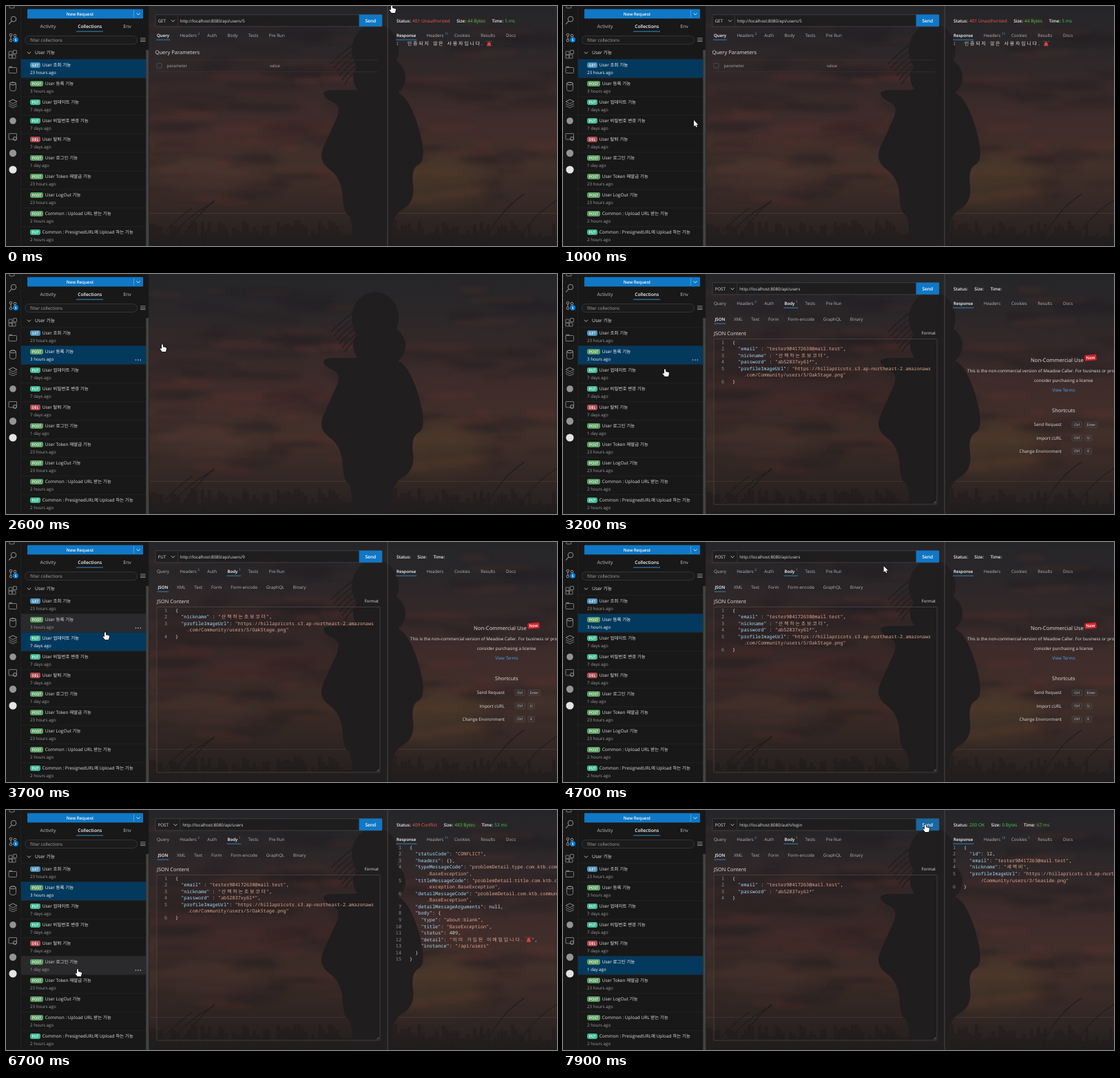
These frames come from a looping animation (800 by 349 pixels, 8 s). An HTML page with a canvas:

```html
<!DOCTYPE html>
<html lang="ko">
<head>
<meta charset="utf-8">
<title>API client</title>
<style>
html, body { margin: 0; width: 100%; height: 100%; overflow: hidden; background: #181818; }
canvas { display: block; width: 800px; height: 349px; }
</style>
</head>
<body>
<canvas id="stage"></canvas>
<script>
const W = 800, H = 349, LOOP = 8000, LAG = 300;
const SANS = '"Open Sans", "Noto Sans CJK KR", "Noto Sans CJK", sans-serif';
const MONO = '"Noto Sans Mono", "DejaVu Sans Mono", monospace';
const HANGUL = '"Noto Sans CJK KR", "Noto Sans CJK", sans-serif';
const CELL = 4.12, ROW_TOP = 77.5, ROW_H = 27;
const BLUE = '#1078c6', ACCENT = '#2f8fca', GREEN = '#45cf50', RED = '#fa5a56';
const GREY = '#a8a8a8', LIGHT = '#e0e0e0', WHITE = '#fff', STRING = '#dfa78f';
const SEND = { x: 512.6, y: 12.6, w: 33.4, h: 17.2 };

const dpr = window.devicePixelRatio || 1;
function makeCanvas(el) {
  el.width = W * dpr;
  el.height = H * dpr;
  const c = el.getContext('2d');
  c.scale(dpr, dpr);
  return c;
}
const ctx = makeCanvas(document.getElementById('stage'));
ctx.textRendering = 'geometricPrecision';

// ---------- helpers ----------
function text(s, x, y, size = 6.2, color = LIGHT, weight = 400, align = 'left') {
  ctx.font = `${weight} ${size}px ${SANS}`;
  ctx.textAlign = align;
  ctx.fillStyle = color;
  ctx.fillText(s, x, y + size * 0.36);
  return ctx.measureText(s).width;
}
function rect(x, y, w, h, color) {
  ctx.fillStyle = color;
  ctx.fillRect(x, y, w, h);
}
function pill(x, y, w, h, r, fill, stroke) {
  ctx.beginPath();
  ctx.roundRect(x, y, w, h, r);
  if (fill) { ctx.fillStyle = fill; ctx.fill(); }
  if (stroke) { ctx.strokeStyle = stroke; ctx.lineWidth = 0.8; ctx.stroke(); }
}
function line(points, color, width = 0.8) {
  ctx.beginPath();
  points.forEach(([x, y]) => ctx.lineTo(x, y));
  ctx.strokeStyle = color;
  ctx.lineWidth = width;
  ctx.stroke();
}
function dot(x, y, r, color) {
  ctx.beginPath();
  ctx.arc(x, y, r, 0, 7);
  ctx.fillStyle = color;
  ctx.fill();
}
function ring(x, y, rx, ry, color) {
  ctx.beginPath();
  ctx.ellipse(x, y, rx, ry, 0, 0, 7);
  ctx.strokeStyle = color;
  ctx.lineWidth = 1;
  ctx.stroke();
}
const vee = (x, y, w, h, color) => line([[x - w, y - h], [x, y + h], [x + w, y - h]], color);
const chevron = (x, y, color = LIGHT) => vee(x, y, 2.5, 1.3, color);

// ---------- backdrop ----------
function makeBackdrop() {
  const el = document.createElement('canvas');
  const c = makeCanvas(el);
  let seed = 11;
  const rnd = (a = 0, b = 1) => a + (b - a) * (seed = seed * 16807 % 2147483647) / 2147483647;
  const blob = (x, y, rx, ry, tilt, color) => {
    c.fillStyle = color;
    c.beginPath();
    c.ellipse(x, y, rx, ry, tilt, 0, 7);
    c.fill();
  };
  const sky = c.createLinearGradient(0, 0, 0, H);
  ['#252528', '#2b2729', '#37292a', '#402d2b', '#42302a', '#352825', '#242021']
    .forEach((col, i, all) => sky.addColorStop(i / (all.length - 1), col));
  c.fillStyle = sky;
  c.fillRect(0, 0, W, H);
  c.filter = 'blur(3px)';
  for (let i = 0; i < 130; i++) {
    const color = rnd() < 0.4 ? 'rgba(112,56,48,.17)' : 'rgba(33,32,36,.3)';
    blob(rnd(208, W), rnd(20, 285), rnd(14, 60), rnd(2, 8), rnd(-0.1, 0.1), color);
  }
  c.filter = 'blur(14px)';
  blob(615, 255, 80, 35, 0, 'rgba(98,76,46,.3)');
  blob(290, 240, 75, 20, 0, 'rgba(95,72,64,.25)');
  c.filter = 'none';
  c.fillStyle = 'rgba(95,85,50,.5)';
  c.fillRect(208, 301, W - 208, 0.8);
  c.fillStyle = 'rgba(24,20,20,.3)';
  for (let x = 208; x < W; x += 5) {
    const h = rnd(12, 38);
    c.fillRect(x, H - h, 4.5, h);
  }
  const stroke = (x, y, mx, my, tx, ty) => {
    c.beginPath();
    c.moveTo(x, y);
    c.quadraticCurveTo(mx, my, tx, ty);
    c.stroke();
  };
  c.strokeStyle = c.fillStyle = '#211e20';
  c.lineWidth = 1.4;
  for (const x of [214, 232, 250, 692, 740]) {
    const ty = rnd(262, 296);
    stroke(x, H, x + 22, ty + 25, x + rnd(45, 85), ty);
  }
  // plain figure seen from behind: head, wind-blown hair, coat and legs
  blob(536, 64, 34, 38, 0, '#211e20');
  blob(542, 104, 38, 32, 0, '#211e20');
  for (let i = 0; i < 6; i++) stroke(515, 50 + i * 8, 495, 60 + i * 9, 472 + i * 4, 84 + i * 6);
  const coat = [[500, 122], [460, 122], [462, 134], [488, 146], [470, 185], [452, 225], [487, 250], [490, 300],
    [502, 306], [504, 360], [556, 360], [560, 305], [594, 285], [588, 236], [610, 225], [596, 160], [570, 118]];
  c.beginPath();
  coat.forEach(([x, y], i) => {
    const [nx, ny] = coat[(i + 1) % coat.length];
    c.quadraticCurveTo(x, y, (x + nx) / 2, (y + ny) / 2);
  });
  c.fill();
  return el;
}
const backdrop = makeBackdrop();

// ---------- sidebar ----------
const BADGES = { GET: '#4f92ba', POST: '#5fa065', PUT: '#43b897', DEL: '#b04d54' };
const ROWS = [
  ['GET', 'User 조회 기능', '23 hours ago'], ['POST', 'User 등록 기능', '3 hours ago'],
  ['PUT', 'User 업데이트 기능', '7 days ago'], ['PUT', 'User 비밀번호 변경 기능', '7 days ago'],
  ['DEL', 'User 탈퇴 기능', '7 days ago'], ['POST', 'User 로그인 기능', '1 day ago'],
  ['POST', 'User Token 재발급 기능', '23 hours ago'], ['POST', 'User LogOut 기능', '23 hours ago'],
  ['POST', 'Common : Upload URL 받는 기능', '2 hours ago'],
  ['PUT', 'Common : PresignedURL에 Upload 하는 기능', '2 hours ago']
];

function activityBar() {
  const col = '#949494';
  pill(5, -5, 7, 8, 1, null, col);
  ring(11, 19, 3.8, 3.8, col);
  line([[8.3, 21.8], [4, 26.5]], col, 1.1);
  for (const [x, y] of [[7, 42], [13, 43], [7, 50]]) ring(x, y, 1.8, 1.8, col);
  line([[7, 48], [7, 44]], col, 1);
  dot(14, 49, 4, '#0078d4');
  text('5', 14, 49, 4.8, WHITE, 700, 'center');
  for (const [x, y] of [[4, 66], [4, 71], [9, 71], [10.5, 64.5]]) pill(x, y, 5, 5, 0.4, null, col);
  pill(4, 89.5, 11.5, 8, 1, null, col);
  line([[4, 89], [8, 88], [9.5, 89.5]], col, 1);
  pill(5.5, 111, 9, 12.5, 3, null, col);
  ring(10, 113, 4.5, 1.8, col);
  line([[4, 139], [10, 136], [16, 139]], col, 1);
  for (let i = 0; i < 3; i++) vee(10, 140.5 + i * 3, 6, 1.5, col);
  pill(4, 185.5, 11.5, 8.5, 0.5, null, col);
  ring(13, 193, 2.6, 2.6, col);
  dot(10, 167, 4.8, col);
  dot(10, 214, 5.2, col);
  dot(10, 238, 5.6, '#e4e4e4');
}

function sidebar(selected, hover) {
  rect(0, 0, 208, H, '#181818');
  rect(21, 0, 0.8, H, '#252525');
  activityBar();
  pill(31, 4.5, 168, 13.8, 1, BLUE);
  rect(185, 6, 0.7, 10.5, '#6fb2e2');
  text('New Request', 107.5, 11.6, 6.2, WHITE, 600, 'center');
  chevron(192, 11.6, WHITE);
  text('Activity', 61, 29.2, 6.9, '#c0c0c0', 400, 'center');
  text('Collections', 121.7, 29.2, 6.6, WHITE, 600, 'center');
  text('Env', 176, 29.2, 6.9, '#c0c0c0', 400, 'center');
  rect(102, 36.5, 39, 1, ACCENT);
  pill(27.5, 43.5, 163, 12, 6, '#1b1b1b', '#3c3c3c');
  text('filter collections', 35, 49.8, 6.4, GREY);
  for (let i = 0; i < 3; i++) rect(195, 46.5 + i * 2.4, 7.5, 0.7, '#c0c0c0');
  chevron(33.5, 68);
  text('User 기능', 42, 68, 6.8);
  ROWS.forEach(([method, name, age], i) => {
    const y = ROW_TOP + i * ROW_H, on = i === selected, w = 3 + 4 * method.length;
    rect(22, y, 181, 0.6, '#262626');
    if (on || i === hover) rect(22, y, 181, ROW_H, on ? '#04395e' : '#2a2a2c');
    pill(35, y + 4.4, w, 8, 2.4, BADGES[method]);
    text(method, 35 + w / 2, y + 8.5, 5.3, WHITE, 600, 'center');
    text(name, 37.7 + w, y + 8.5, 6.5, on ? WHITE : LIGHT);
    text(age, 35, y + 19.6, 6.2, on ? WHITE : '#a0a0a0');
    if (i === hover) for (let k = 0; k < 3; k++) dot(188.5 + k * 3.4, y + 20.5, 0.75, LIGHT);
  });
  rect(203.3, 64, 4, H - 64, '#434343');
  rect(207.3, 0, 0.8, H, '#2a2a2a');
}

// ---------- code view ----------
function siren(x, y) {
  pill(x + 1.6, y - 2, 4.8, 4.5, [2.4, 2.4, 0, 0], '#e0413d');
  rect(x + 0.8, y + 2.3, 6.4, 1.5, '#c8403c');
  for (let i = -1; i < 2; i++) line([[x + 4 + i * 3.6, y - 3.5], [x + 4 + i * 2.6, y - 2.4]], '#e98d80');
}
function codeRun(s, x, y, color) {
  ctx.textAlign = 'left';
  for (const part of s.split(/([가-힣]+|🚨)/u)) {
    if (!part) continue;
    ctx.fillStyle = color;
    if (part === '🚨') {
      siren(x, y);
      x += CELL * 2;
    } else if (/[가-힣]/.test(part)) {
      ctx.font = `400 7px ${HANGUL}`;
      ctx.letterSpacing = '1.8px';
      ctx.fillText(part, x + 0.8, y + 2.4);
      ctx.letterSpacing = '0px';
      x += part.length * CELL * 2;
    } else {
      ctx.font = `500 6.87px ${MONO}`;
      ctx.fillText(part, x, y + 2.4);
      x += part.length * CELL;
    }
  }
  return x;
}
function tokenColor(tok, rest) {
  if (tok[0] === '"') return /^\s*:/.test(rest) ? '#a2dcfa' : STRING;
  if (tok === 'null') return '#b9d4ea';
  return /^\d/.test(tok) ? '#c5dcb8' : LIGHT;
}
// A leading "~" marks the wrapped tail of the line above.
function code(lines, x, y0, step, wrap) {
  let n = 0;
  lines.forEach((raw, i) => {
    const y = y0 + i * step;
    if (raw[0] === '~') {
      codeRun(raw.slice(1), x + wrap * CELL, y, STRING);
      return;
    }
    const num = String(++n);
    codeRun(num, x - 12 - num.length * CELL, y, '#8c9196');
    const body = raw.trimStart();
    let cx = x + (raw.length - body.length) * CELL;
    for (const m of body.matchAll(/"[^"]*"?|\w+|[^"\w]+/g))
      cx = codeRun(m[0], cx, y, tokenColor(m[0], body.slice(m.index + m[0].length)));
  });
}

// ---------- request and response data ----------
const LOCAL = 'http://localhost:8080';
const IMAGE = '  "profileImageUrl": "https://hillapricots.s3.ap-northeast-2.amazonaws';
const IMAGE_END = '~.com/Community/users/5/OakStage.png"';
const NICK = '  "nickname" : "산책하는초보코더",';
const REQUESTS = {
  get: { method: 'GET', url: LOCAL + '/api/users/5' },
  put: { method: 'PUT', url: LOCAL + '/api/users/9', body: ['{', NICK, IMAGE, IMAGE_END, '}'] },
  post: { method: 'POST', url: LOCAL + '/api/users', body: ['{', '  "email" : "tester904172638@mail.test",',
    NICK, '  "password" : "ab52837xy61*",', IMAGE, IMAGE_END, '}'] },
  login: { method: 'POST', url: LOCAL + '/auth/login', body: ['{', '  "email" : "tester90417263@mail.test",',
    '  "password" : "ab52837xy61*"', '}'] }
};
const RESPONSES = {
  none: { status: '', size: '', time: '' },
  denied: { status: '401 Unauthorized', size: '44 Bytes', time: '5 ms', headers: '11',
    body: ['인증되지 않은 사용자입니다. 🚨'] },
  conflict: { status: '409 Conflict', size: '483 Bytes', time: '53 ms', headers: '11', body: [
    '{', '  "statusCode": "CONFLICT",', '  "headers": {},',
    '  "typeMessageCode": "problemDetail.type.com.ktb.community', '~.BaseException",',
    '  "titleMessageCode": "problemDetail.title.com.ktb.community', '~.exception.BaseException",',
    '  "detailMessageCode": "problemDetail.com.ktb.community', '~.BaseException",',
    '  "detailMessageArguments": null,', '  "body": {', '    "type": "about:blank",',
    '    "title": "BaseException",', '    "status": 409,', '    "detail": "이미 가입된 이메일입니다. 🚨",',
    '    "instance": "/api/users"', '  }', '}'] },
  ok: { status: '200 OK', size: '0 Bytes', time: '67 ms', headers: '12', cookies: '1', body: [
    '{', '  "id": 12,', '  "email": "tester90417263@mail.test",', '  "nickname": "새벽비",',
    IMAGE, '~/Community/users/3/Seaside.png"', '}'] }
};

// ---------- panels ----------
function tabs(names, x, y, gap, active, marks = {}) {
  for (const name of names) {
    const on = name === active, mark = marks[name];
    const w = text(name, x, y, on ? 6.1 : 6.25, on ? WHITE : '#b4b4b4', on ? 600 : 400);
    if (on) rect(x - 1, y + 6.2, w + (mark ? 6 : 2), 0.9, ACCENT);
    if (mark) text(mark, x + w + 1.5, y - 2, 4.8, '#58b2f0');
    x += w + gap;
  }
}

function requestPanel(req, hot) {
  const split = req.method === 'POST' ? 252.5 : 249;
  pill(217, SEND.y, 329, SEND.h, 1, 'rgba(24,24,24,.55)', '#444');
  text(req.method, 220.5, 21.6);
  chevron(split - 6.5, 21.6);
  rect(split, SEND.y, 0.7, SEND.h, '#3c3c3c');
  text(req.url, split + 3.7, 21.6, 6.15);
  pill(SEND.x, SEND.y, SEND.w, SEND.h, 0.6, hot ? '#1967a3' : BLUE);
  text('Send', SEND.x + SEND.w / 2, 21.4, 6.6, WHITE, 600, 'center');
  tabs(['Query', 'Headers', 'Auth', 'Body', 'Tests', 'Pre Run'], 219, 42.5, 15.4,
    req.body ? 'Body' : 'Query', { Headers: '2', Body: req.body && '1' });
  if (!req.body) {
    text('Query Parameters', 216.5, 67, 7.6);
    for (const y of [78, 95.5]) rect(217, y, 323, 0.6, '#3a3636');
    pill(219, 83.3, 7, 7, 1, null, '#555');
    text('parameter', 233.5, 87, 6, GREY);
    text('value', 383, 87, 6, GREY);
    return;
  }
  tabs(['JSON', 'XML', 'Text', 'Form', 'Form-encode', 'GraphQL', 'Binary'], 220.5, 65.5, 12.8, 'JSON');
  text('JSON Content', 219, 86, 7.4);
  text('Format', 541, 86, 6.1, LIGHT, 400, 'right');
  pill(219, 94.5, 324, 240.5, 0.5, 'rgba(22,21,22,.15)', '#4a4646');
  for (const d of [1.2, 3]) line([[541.5 - d, 333.5], [541.5, 333.5 - d]], '#aaa', 0.6);
  code(req.body, 246, 99.5, 9.5, 4);
}

function keyCap(label, x, w, y) {
  pill(x, y - 4.2, w, 8.6, 1.5, 'rgba(70,64,64,.35)', '#4c4848');
  text(label, x + w / 2, y, 5, '#d0d0d0', 400, 'center');
}

function notice() {
  const mid = 726.8;
  text('Non-Commercial Use', 679, 125, 7.75);
  ctx.save();
  ctx.translate(766, 121.7);
  ctx.rotate(-0.08);
  pill(-8.5, -4.2, 17, 8.4, 1.5, '#d3232b');
  text('New', 0, 0, 6, WHITE, 600, 'center');
  ctx.restore();
  text('This is the non-commercial version of Meadow Caller. For business or professional use, please', 587, 141, 6.25);
  text('consider purchasing a license', mid, 155, 6.25, LIGHT, 400, 'center');
  text('View Terms', mid, 169, 6.3, '#45a8f0', 400, 'center');
  text('Shortcuts', mid, 198.5, 7.5, LIGHT, 400, 'center');
  [['Send Request', 'Enter'], ['Import cURL', 'U'], ['Change Environment', 'E']].forEach(([label, key], i) => {
    const y = 219.2 + i * 19.2;
    text(label, 724, y, 6.3, LIGHT, 400, 'right');
    keyCap('Ctrl', 739, 14.5, y);
    keyCap(key, 758, 7.4 + 2.1 * key.length, y);
  });
}

function responsePanel(res) {
  rect(553.6, 0, 0.9, H, '#4e4b4b');
  let x = 567;
  const good = res.status.startsWith('2') ? GREEN : RED;
  for (const [label, value, col] of [['Status:', res.status, good], ['Size:', res.size, GREEN], ['Time:', res.time, GREEN]]) {
    x += text(label, x, 22, 6.3, '#f0f0f0', 600);
    if (value) x += 2.2 + text(value, x + 2.2, 22, 6.55, col);
    x += 9.5;
  }
  tabs(['Response', 'Headers', 'Cookies', 'Results', 'Docs'], 567, 42.5, 15.6, 'Response',
    { Headers: res.headers, Cookies: res.cookies });
  if (res.body) code(res.body, res.body.length > 9 ? 586 : 582, 54.4, 9.56, 6);
  else notice();
}

// ---------- cursor ----------
const HAND = new Path2D('M0 1Q1 -.6 2 1V4L6 5Q7.4 5 7 7L5.8 11H.8L-2.4 7Q-2 5.4 0 7Z');
const ARROW = new Path2D('M0 0V9L2 7.2L3.4 10.2L4.8 9.6L3.5 6.7H6.3Z');
function drawCursor(x, y, path) {
  ctx.save();
  ctx.translate(x, y);
  ctx.lineJoin = 'round';
  ctx.strokeStyle = '#111';
  ctx.lineWidth = 1.4;
  ctx.stroke(path);
  ctx.fillStyle = WHITE;
  ctx.fill(path);
  ctx.restore();
}

// ---------- timeline ----------
const VIEWS = [
  [0, 0, 'get', 'denied'], [2200, 1], [2800, 1, 'post', 'none'], [3300, 2], [3600, 2, 'put', 'none'],
  [4100, 1, 'post', 'none'], [5200, 1, 'post', 'conflict'], [6900, 5], [7100, 5, 'login', 'none'],
  [7700, 5, 'login', 'ok']
];
const PATH = [
  [0, 559, -1], [1000, 190, 166], [1500, 180, 168], [1800, 175, 113], [2300, 172, 109], [2600, 226, 102],
  [3200, 147, 138], [3400, 144, 128], [3700, 143, 131], [4100, 140, 110], [4900, 526, 21], [5500, 525, 20],
  [6000, 417, 63], [6400, 112, 222], [6700, 103, 231], [6900, 104, 226], [7500, 526, 22], [LOOP, 525, 21]
];

function cursorAt(t) {
  const i = PATH.findIndex(p => p[0] > t);
  const [t0, x0, y0] = PATH[i - 1], [t1, x1, y1] = PATH[i];
  const u = (t - t0) / (t1 - t0), k = u * u * (3 - 2 * u);
  return [x0 + (x1 - x0) * k, y0 + (y1 - y0) * k];
}
const overSend = ([x, y]) => x > SEND.x && x < SEND.x + SEND.w && y > SEND.y && y < SEND.y + SEND.h;
const rowUnder = ([x, y]) => x > 22 && x < 203 ? Math.floor((y - ROW_TOP) / ROW_H) : -1;

function draw(t) {
  const [, selected, req, res] = VIEWS.filter(v => v[0] <= t).pop();
  const pos = cursorAt(t);
  const late = cursorAt((t - LAG + LOOP) % LOOP); // hover feedback trails the pointer
  const hover = rowUnder(late);
  ctx.drawImage(backdrop, 0, 0, W, H);
  sidebar(selected, hover);
  if (req) {
    requestPanel(REQUESTS[req], overSend(pos));
    responsePanel(RESPONSES[res]);
  }
  drawCursor(...pos, hover >= 0 || overSend(late) ? HAND : ARROW);
}

const start = performance.now();
function tick() {
  const t = (performance.now() - start) % LOOP;
  draw(Math.floor(t / 100) * 100);
  requestAnimationFrame(tick);
}
tick();
</script>
</body>
</html>
```
